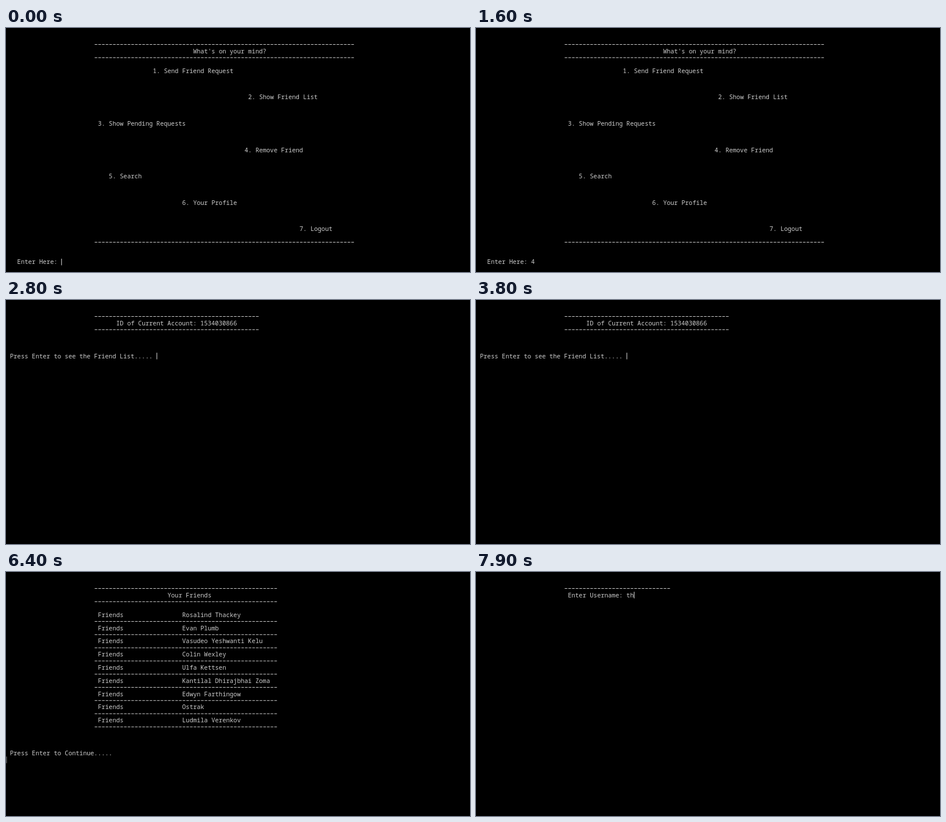
These frames come from a looping animation (800x422 px, 8000 ms). An HTML page with a canvas:

```html
<!DOCTYPE html>
<html lang="en">
<head>
<meta charset="utf-8">
<title>Terminal session</title>
<style>
  html, body { margin: 0; width: 100%; height: 100%; overflow: hidden; background: #000; }
  canvas { display: block; }
</style>
</head>
<body>
<canvas id="stage" width="800" height="422"></canvas>
<script>
const ctx = document.getElementById('stage').getContext('2d');
const LOOP = 8000, STEP = 100, BLINK = 530;
const CELL_W = 6.32, CELL_H = 11.4, LEFT = 0.4;
const INK = '#ccc';

const colX = col => LEFT + col * CELL_W;

function put(row, col, text) {
  ctx.fillText(text, colX(col), row * CELL_H + 9.3);
}

function rule(row, count) {
  for (let i = 0; i < count; i++) {
    ctx.fillRect(colX(24 + i) + 0.8, row * CELL_H + 5.2, 4.6, 1);
  }
}

function caret(row, col, color = INK) {
  ctx.fillStyle = color;
  ctx.fillRect(colX(col), row * CELL_H, 1.1, CELL_H);
}

const menuItems = [
  [40, 'Send Friend Request'], [66, 'Show Friend List'],
  [25, 'Show Pending Requests'], [65, 'Remove Friend'],
  [28, 'Search'], [48, 'Your Profile'], [80, 'Logout']
];

const friends = [
  'Rosalind Thackey', 'Evan Plumb', 'Vasudeo Yeshwanti Kelu',
  'Colin Wexley', 'Ulfa Kettsen', 'Kantilal Dhirajbhai Zoma',
  'Edwyn Farthingow', 'Ostrak', 'Ludmila Verenkov'
];

function menu(input, scroll = 0) {
  rule(2 - scroll, 71);
  put(3 - scroll, 51, "What's on your mind?");
  rule(4 - scroll, 71);
  menuItems.forEach(([col, label], i) => put(6 + 4 * i - scroll, col, `${i + 1}. ${label}`));
  rule(32 - scroll, 71);
  put(35 - scroll, 3, 'Enter Here: ' + input);
}

function menuDone() {
  menu('4', 3);
  put(36, 1, 'Press Enter to Continue.....');
}

function account() {
  rule(2, 45);
  put(3, 30, 'ID of Current Account: 1534030866');
  rule(4, 45);
  put(8, 1, 'Press Enter to see the Friend List.....');
}

function friendList() {
  rule(2, 50);
  put(3, 44, 'Your Friends');
  rule(4, 50);
  friends.forEach((name, i) => {
    put(6 + 2 * i, 25, 'Friends');
    put(6 + 2 * i, 48, name);
    rule(7 + 2 * i, 50);
  });
  put(27, 1, 'Press Enter to Continue.....');
}

function username(typed) {
  rule(2, 29);
  put(3, 25, 'Enter Username: ' + typed);
}

// Each key press restarts the caret blink from `blinkFrom`.
const scenes = [
  { at: 0,    blinkFrom: -200, draw: () => menu(''),      caret: [35, 15] },
  { at: 700,  blinkFrom: 700,  draw: () => menu('4'),     caret: [35, 16] },
  { at: 1700, blinkFrom: 1660, draw: menuDone,            caret: [36, 30] },
  { at: 2800, blinkFrom: 2780, draw: account,             caret: [8, 41] },
  { at: 4400, blinkFrom: 4390, draw: friendList,          caret: [27, 30] },
  { at: 6400, blinkFrom: 6420, draw: friendList,          caret: [28, 0, '#777'] },
  { at: 6500, blinkFrom: 6420, draw: () => username(''),  caret: [3, 41] },
  { at: 7700, blinkFrom: 7700, draw: () => username('t'), caret: [3, 42] },
  { at: 7900, blinkFrom: 7900, draw: () => username('th'), caret: [3, 43] }
];

function render(time) {
  const t = Math.floor((time % LOOP) / STEP) * STEP;
  const scene = scenes.findLast(s => s.at <= t);
  ctx.fillStyle = '#000';
  ctx.fillRect(0, 0, 800, 422);
  ctx.fillStyle = INK;
  ctx.font = '10.533px "Noto Sans Mono", monospace';
  scene.draw();
  const blinks = Math.floor((t + STEP / 2 - scene.blinkFrom) / BLINK);
  if (blinks % 2 === 0) caret(...scene.caret);
}

const start = performance.now();
function tick() {
  render(performance.now() - start);
  requestAnimationFrame(tick);
}
tick();
</script>
</body>
</html>
```
